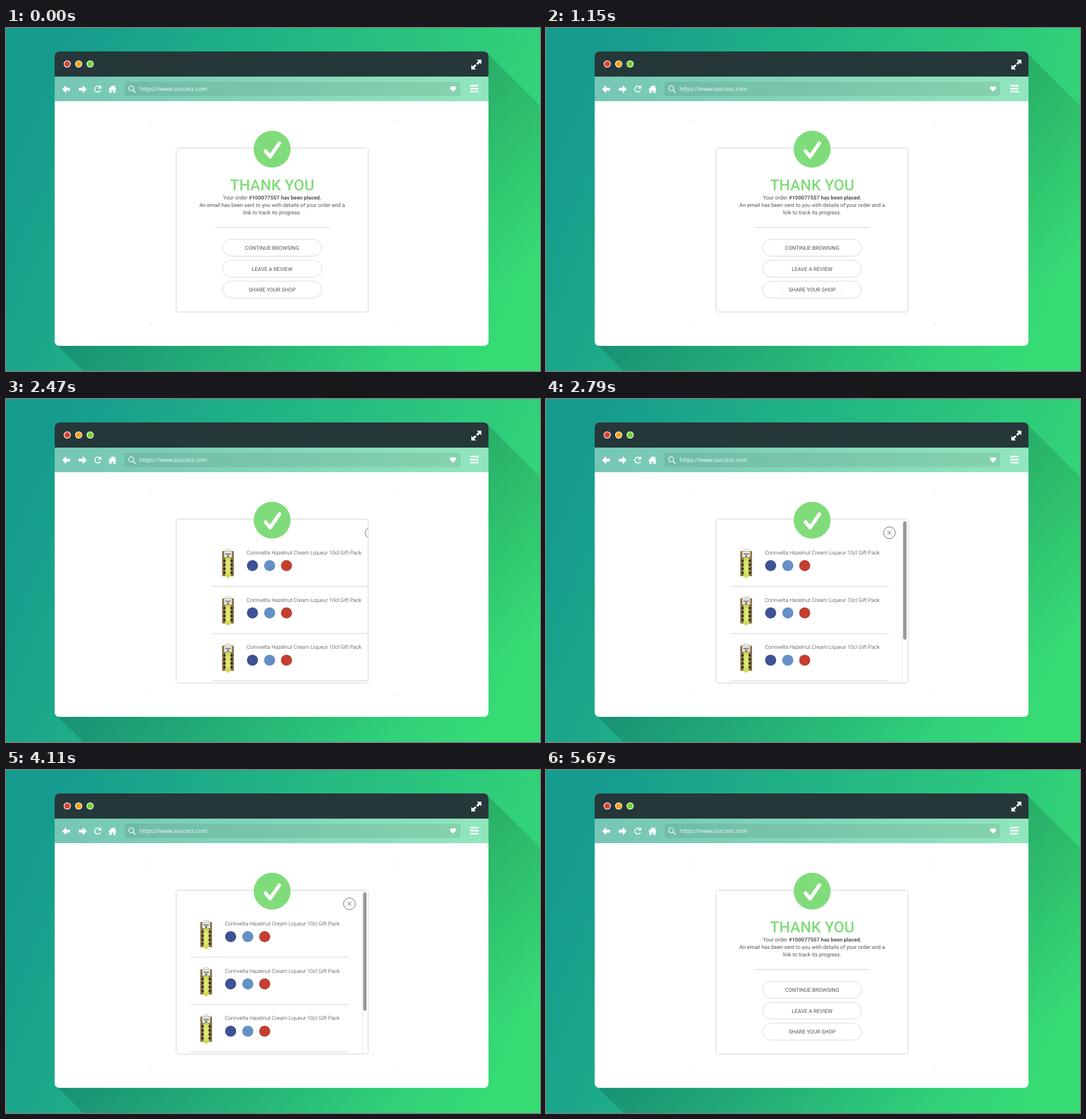
Recreate the animation shown at these times as an HTML page. Size 933x600 px, loop 5.71 s.

```html
<!DOCTYPE html>
<html lang="en">
<head>
<meta charset="utf-8">
<title>Order placed</title>
<style>
html, body { margin: 0; width: 100%; height: 100%; overflow: hidden; }
svg { display: block; width: 933px; height: 600px; }
text { font-family: Roboto, sans-serif; font-size: 9.33px; fill: #555; text-rendering: geometricPrecision; }
.mid { text-anchor: middle; }
.title { font-size: 26.67px; font-weight: 500; fill: #80dc7a; }
.url { font-family: "Open Sans", sans-serif; font-size: 10px; fill: #fff; }
.product { font-weight: 300; fill: #333; }
.pill { fill: #fff; stroke: #d6d6d6; }
.line { fill: none; stroke: #fff; stroke-width: 1.7; }
</style>
</head>
<body>
<svg viewBox="0 0 933 600">
  <defs>
    <linearGradient id="back" gradientUnits="userSpaceOnUse" x1="60" y1="120" x2="900" y2="480">
      <stop stop-color="#159c8e"/><stop offset="1" stop-color="#37dc74"/>
    </linearGradient>
    <linearGradient id="shade" gradientUnits="userSpaceOnUse" x1="466" y1="303" x2="661" y2="594">
      <stop stop-opacity=".15"/><stop offset="1" stop-opacity="0"/>
    </linearGradient>
    <linearGradient id="bar">
      <stop stop-color="#75c6b5"/><stop offset="1" stop-color="#92e6be"/>
    </linearGradient>
    <clipPath id="window"><rect x="85" y="41" width="758" height="515" rx="8"/></clipPath>
    <clipPath id="card"><rect x="298" y="211" width="334" height="285" rx="3"/></clipPath>
    <filter id="glow" x="-5%" y="-5%" width="110%" height="110%">
      <feDropShadow dx="0" dy="0" stdDeviation="1.8" flood-opacity=".38"/>
    </filter>
  </defs>

  <rect width="933" height="600" fill="url(#back)"/>
  <path d="M840 43L933 136V600H135L88 553Z" fill="url(#shade)"/>

  <g clip-path="url(#window)">
    <path d="M85 41h758v515H85z" fill="#fff"/>
    <path d="M85 41h758v44H85z" fill="#253739"/>
    <path d="M85 85h758v43H85z" fill="url(#bar)"/>
  </g>
  <g stroke="#fff" stroke-width="1.2">
    <circle cx="107" cy="63" r="5.6" fill="#d8402f"/>
    <circle cx="127" cy="63" r="5.6" fill="#f9a11b"/>
    <circle cx="147" cy="63" r="5.6" fill="#6fd62c"/>
  </g>
  <rect x="207" y="94" width="587" height="25" rx="4" fill-opacity=".08"/>

  <g fill="#fff">
    <path d="M822.5 55.5h8v8l-2.700-2.700-3.800 3.800-2.500-2.500 3.800-3.800zM813 64.500l2.700 2.700 3.800-3.800 2.500 2.500-3.800 3.800 2.700 2.700h-7.900z"/>
    <path id="arrow" d="M98 107l7-7v4.500h7v5h-7v4.500z"/>
    <use href="#arrow" transform="matrix(-1 0 0 1 239 0)"/>
    <path d="M166.500 100v6h-6z"/>
    <path d="M178.500 107.500l7.500-7.500 2.500 2.500V101h2.500v4l2.500 2.500h-2v6h-4v-4h-3v4h-4v-6z"/>
    <path d="M781 111.500l-4.600-4.700a2.900 2.900 0 0 1 4.600-3.700 2.900 2.900 0 0 1 4.600 3.700z"/>
    <path d="M811 99.500h14.500v2.700H811zm0 5.200h14.500v2.700H811zm0 5.200h14.500v2.700H811z"/>
  </g>
  <path class="line" d="M164.500 103.500a5.200 5.200 0 1 0 .6 5.700"/>
  <circle class="line" cx="218.800" cy="105.500" r="4.300" style="stroke-width:1.300"/>
  <path class="line" d="M222 109l4 4"/>
  <text class="url" x="233.500" y="110">https://www.success.com</text>
  <path d="M253 164h1v1h-1zM679 164h1v1h-1zM253 517h1v1h-1zM679 517h1v1h-1z" fill="#aaa"/>

  <rect x="298" y="211" width="334" height="285" rx="3" fill="#fff" filter="url(#glow)"/>
  <g clip-path="url(#card)">
    <text class="title mid" x="465" y="283.500">THANK YOU</text>
    <text class="mid" x="465" y="300.400">Your order <tspan font-weight="700">#100077557 has been placed.</tspan></text>
    <text class="mid" x="465" y="313.100">An email has been sent to you with details of your order and a</text>
    <text class="mid" x="465" y="325.800">link to track its progress.</text>
    <path d="M365 349h200" stroke="#ccc"/>
    <g id="buttons"></g>
    <g id="share"></g>
    <g id="panel"></g>
  </g>

  <circle cx="465" cy="212" r="32.300" fill="#80dc7a"/>
  <path d="M453.500 215.500l8 9.500 16-23.500" fill="none" stroke="#fff" stroke-width="6.500" stroke-linecap="round" stroke-linejoin="round"/>
</svg>
<script>
const LOOP = 5710, SLIDE = 500, OPEN = 2170, CLOSE = 4340, HOVER = 1150;
const $ = id => document.getElementById(id);

const pill = (y, label, stroke = '') =>
  `<rect class="pill" x="378.500" y="${y}" width="173" height="29.500" rx="14.750" ${stroke}/>
   <text class="mid" x="465" y="${y + 18.3}">${label}</text>`;

const badges = (xs, y) => xs.map((x, i) =>
  `<circle cx="${x}" cy="${y}" r="9.700" fill="${['#3e5295', '#6490c6', '#c23f31'][i]}"/>`).join('');

const pack = () => {
  let dots = '';
  for (let i = 0; i < 4; i++)
    for (const x of [343.5, 356]) dots += `<circle cx="${x}" cy="${283 + i * 7}" r="2.100"/>`;
  return `<path d="M344.500 269v-4q5-4.500 10 0v4" fill="none" stroke="#d8d8d4" stroke-width="2"/>
    <path d="M339.500 266h20.500v44h-20.500z" fill="#8b7448"/>
    <path d="M343 266.500h13.500v10.500H343z" fill="#e8e8e2"/>
    <path d="M345 270h9.500v2H345zM348 273h3.500v6H348z" fill="#777"/>
    <path d="M345 279q4.800-4 9.700 0v31h-2v3h-6v-3H345z" fill="#cfdc52"/>
    <g fill="#2c2820">${dots}</g>
    <path d="M347.500 283h4.500v22h-4.500z" fill="#e0e982"/>`;
};

const row = i => `<g transform="translate(0 ${i * 82.7})">${pack()}
  <text class="product" x="382.500" y="272">Corinvelta Hazelnut Cream Liqueur 10cl Gift Pack</text>
  ${badges([392.5, 422.5, 452], 291.5)}
  <path d="M322 327.500h277" stroke="#d2d2d2"/></g>`;

$('buttons').innerHTML = pill(369.7, 'CONTINUE BROWSING') + pill(406.3, 'LEAVE A REVIEW') + pill(442.9, 'SHARE YOUR SHOP');
$('share').innerHTML = pill(442.9, '', 'style="stroke:#555"') + badges([420, 465, 510.5], 458);
$('panel').innerHTML = `<path d="M298 211h336v285H298z" fill="#fff"/>
  ${[0, 1, 2].map(row).join('')}
  <g fill="none" stroke="#666"><circle cx="600" cy="234" r="10.300"/><path d="M596.500 230.500l7 7m0-7l-7 7"/></g>
  <path d="M622.500 211v285" stroke="#e8e8e8"/>
  <rect x="624" y="214" width="6" height="207" rx="3" fill="#999"/>`;

const clamp = v => Math.min(1, Math.max(0, v));

// The standard "ease" curve, cubic-bezier(.25, .1, .25, 1).
function ease(p) {
  let lo = 0, hi = 1, s;
  for (let i = 0; i < 20; i++) {
    s = (lo + hi) / 2;
    const x = .75 * s * (1 - s) + s ** 3;
    if (x < p) lo = s; else hi = s;
  }
  return .3 * s * (1 - s) ** 2 + 3 * s * s * (1 - s) + s ** 3;
}

function draw(now) {
  const t = now % LOOP;
  const shown = ease(clamp((t - OPEN) / SLIDE)) - ease(clamp((t - CLOSE) / SLIDE));
  $('panel').setAttribute('transform', `translate(${336 * (1 - shown)} 0)`);
  $('panel').style.display = shown > .001 ? '' : 'none';
  $('share').style.opacity = t < OPEN + SLIDE ? clamp((t - HOVER) / 200) : 0;
  requestAnimationFrame(draw);
}
const start = performance.now();
requestAnimationFrame(function first() { draw(performance.now() - start); });
</script>
</body>
</html>
```
